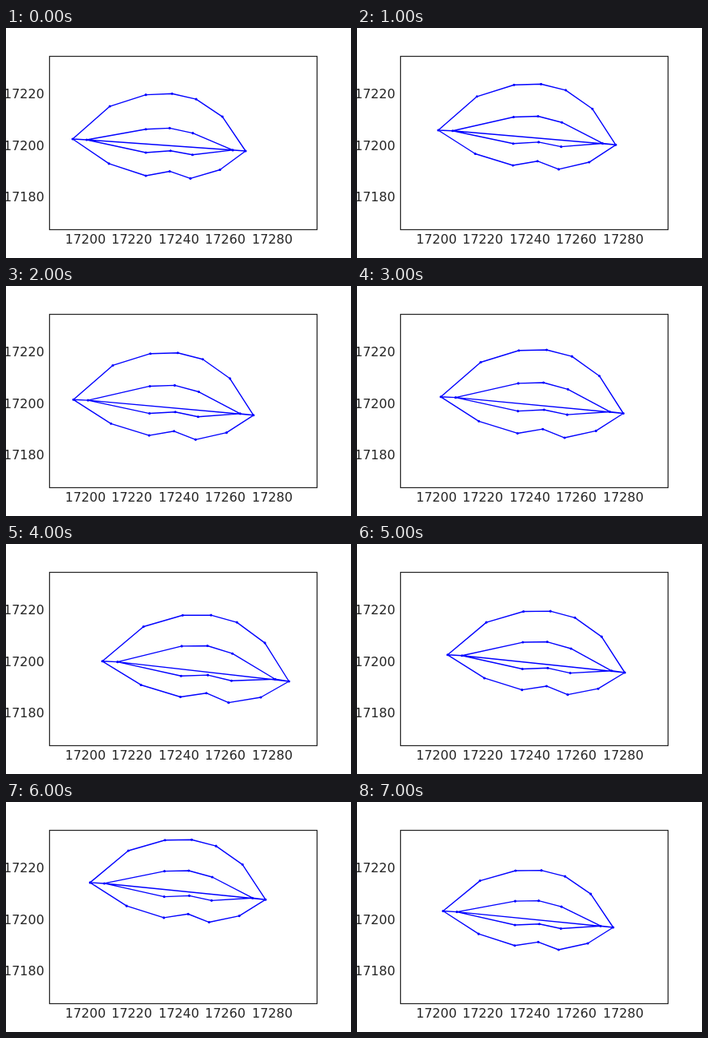
Recreate the animation shown at these times as an HTML page. Size 432 px wide and 288 px high, loop 8 s.

```html
<!DOCTYPE html>
<html lang="en">
<head>
<meta charset="utf-8">
<title>Lip contour</title>
<style>
html, body { margin: 0; width: 100%; height: 100%; overflow: hidden; background: #fff; }
svg { display: block; width: 432px; height: 288px; }
text { font: 16px "DejaVu Sans", sans-serif; fill: #262626; }
</style>
</head>
<body>
<svg viewBox="0 0 432 288">
  <g id="labels"></g>
  <path id="lips" fill="none" stroke="#00f" stroke-width="1.4" stroke-linejoin="round"/>
  <path id="dots" fill="none" stroke="#00f" stroke-width="3.1" stroke-linecap="round"/>
  <rect x="54.5" y="35.5" width="335" height="217" fill="none" stroke="#262626" stroke-width="1.25"/>
</svg>
<script>
const STEP = 1000;
const $ = id => document.getElementById(id);

function label(value, x, y) {
  const t = document.createElementNS("http://www.w3.org/2000/svg", "text");
  t.setAttribute("x", Math.floor(x));
  t.setAttribute("y", y);
  t.textContent = value;
  $("labels").append(t);
}
for (let i = 0; i < 5; i++) label(17200 + 20 * i, 74.2 + 58.5 * i, 270);
for (let i = 0; i < 3; i++) label(17220 - 20 * i, -3, 88 + 64.5 * i);

// Lip edges in mouth widths: x along the corner line, y away from it.
// rise: how far the middle of the edge lifts as the head pitches.
const edges = {
  top: { rise: 0.008, pts: [[0.215, -0.204], [0.423, -0.285], [0.575, -0.302], [0.714, -0.28], [0.866, -0.189]] },
  bottom: { rise: 0.038, pts: [[0.852, 0.119], [0.681, 0.181], [0.561, 0.148], [0.423, 0.183], [0.21, 0.128]] },
  innerTop: { rise: 0.042, pts: [[0.695, -0.082], [0.561, -0.102], [0.423, -0.086]] },
  innerBottom: { rise: 0.016, pts: [[0.081, -0.001], [0.423, 0.049], [0.566, 0.029], [0.693, 0.043], [0.926, 0]] }
};
const SHEAR = 0.025;

// Both mouth corners, head pitch and lip fullness for each step.
const poses = [
  { left: [83.5, 139], right: [300, 154], pitch: 0, full: 1 },
  { left: [101.8, 128], right: [324, 146.3], pitch: 0.55, full: 1.005 },
  { left: [84.5, 142.3], right: [309.9, 161.8], pitch: 0.6, full: 1.01 },
  { left: [105, 138.8], right: [333.5, 159.5], pitch: 0.62, full: 1.01 },
  { left: [120.7, 146.8], right: [354.3, 172], pitch: 1, full: 1 },
  { left: [113.5, 138.8], right: [335.3, 161], pitch: 0.7, full: 0.99 },
  { left: [105.3, 100.9], right: [325, 122.2], pitch: 0.55, full: 0.98 },
  { left: [107.8, 136.5], right: [320.8, 157], pitch: 0.4, full: 0.965 }
];

function place({ left, right, pitch, full }, { rise, pts }) {
  const [w, h] = [right[0] - left[0], right[1] - left[1]];
  return pts.map(([x, y]) => {
    const u = x - SHEAR * pitch * y;
    const v = full * (y - pitch * rise * Math.sin(Math.PI * x));
    return [left[0] + u * w, left[1] + u * h + v * w];
  });
}

// Upper lip, then lower lip, as one continuous stroke.
function outline(pose) {
  const { left, right } = pose;
  const [top, bottom, innerTop, innerBottom] = Object.values(edges).map(e => place(pose, e));
  const [innerLeft, innerRight] = [innerBottom[0], innerBottom.at(-1)];
  return [left, ...top, right, innerRight, ...innerTop, innerLeft,
    right, ...bottom, left, ...innerBottom];
}

function draw(time) {
  const pts = outline(poses[Math.floor(time / STEP) % poses.length])
    .map(p => p.map(v => v.toFixed(2)).join(" "));
  $("lips").setAttribute("d", "M" + pts.join("L"));
  $("dots").setAttribute("d", pts.map(p => `M${p}h0`).join(""));
}

const start = performance.now();
function tick() {
  draw(performance.now() - start);
  requestAnimationFrame(tick);
}
tick();
</script>
</body>
</html>
```
